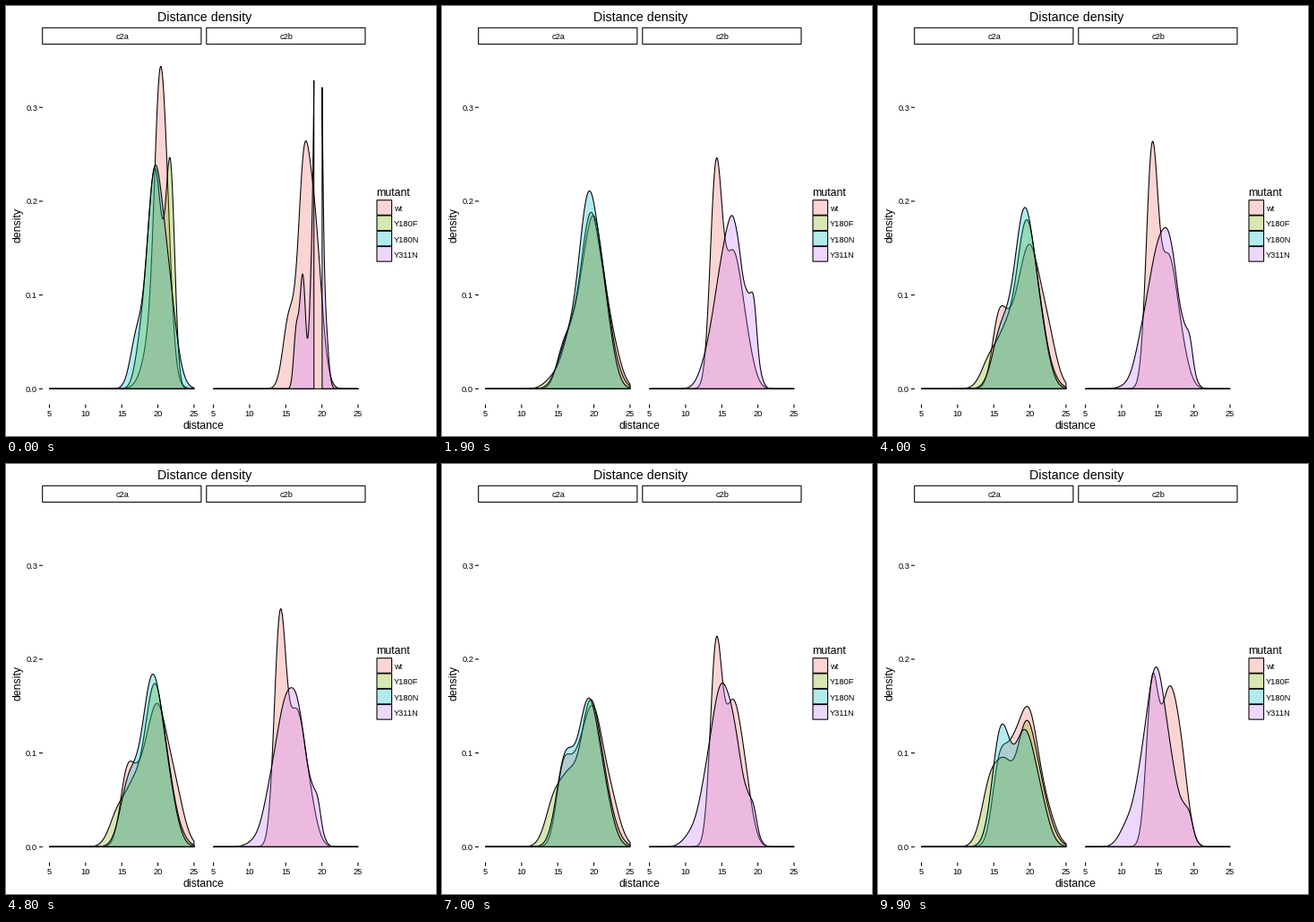
A matplotlib script for the animation above (10 s loop, 480 px wide and 480 px high).

```python
import numpy as np
import matplotlib.pyplot as plt
from matplotlib.animation import FuncAnimation
from matplotlib.colors import to_rgba
from matplotlib.patches import Rectangle

FRAMES, STEP_MS = 100, 100
PHASES = 12, 30, 99
COLORS = {"wt": "#F8766D", "Y180F": "#7CAE00", "Y180N": "#00BFC4", "Y311N": "#C77CFF"}
LEFT = {"c2a": 48.5, "c2b": 231.6}
X_UNIT, Y_UNIT, Y_ZERO, Y_MAX = 8.07, 1047, 427.3, 0.35
X = np.linspace(5, 25, 512)

# Per curve: bells of the first sample (mean, spread, height), then bells of
# all later samples (mean, spread, height at each phase).
CURVES = {
    ("c2a", "wt"): (
        [(20.2, .7, .21), (21.2, .7, .12), (19.9, 1.4, .085)],
        [(19.7, 1.35, .185, .135, .135), (22.2, 1.3, .045, .07, .035),
         (17.4, 1.1, .05, .04, .07), (15.7, .95, .015, .07, .075)]),
    ("c2a", "Y180F"): (
        [(21.75, .6, .215), (19.6, 1.05, .233), (17.6, .8, .035)],
        [(19.5, 1.45, .175, .182, .128), (22, 1.3, .055, .025, .03),
         (16.6, 1, .045, .035, .055), (14.7, 1.25, .005, .03, .074)]),
    ("c2a", "Y180N"): (
        [(19.3, .95, .16), (20.9, 1.3, .14), (17.1, .9, .055)],
        [(19.2, 1.4, .2, .195, .115), (21.5, 1.2, .07, .045, .035),
         (16, 1.2, .035, .048, .122)]),
    ("c2b", "wt"): (
        [(17.4, .75, .167), (18.8, 1.05, .185), (15.5, .85, .077)],
        [(14.2, .8, .22, .265, .163), (16.4, 1.1, .14, .13, .15),
         (18.2, 1, .05, .025, .08)]),
    ("c2b", "Y311N"): (
        [(19.46, .42, .73), (17.35, .4, .12), (16.45, .35, .06),
         (18.5, .3, .08), (20.5, .4, .06)],
        [(16.7, 1.2, .175, .15, .075), (14.7, 1.15, .085, .1, .163),
         (12.8, 1.05, .01, .04, .06), (19, .8, .075, .035, .027),
         (10.8, 1.1, 0, 0, .022)]),
}


def bell(mean, spread, height):
    return height * np.exp(-((X - mean) / spread) ** 2 / 2)


def density(first, later, k):
    """Running average: the first sample fades as 1 / (k + 1)."""
    start = sum(bell(*b) for b in first)
    drift = sum(bell(m, s, np.interp(k, PHASES, h)) for m, s, *h in later)
    return (start + k * drift) / (k + 1)


plt.rcParams["font.family"] = "Liberation Sans"
fig = plt.figure(figsize=(480 / 72, 480 / 72), dpi=72, facecolor="white")
ax = fig.add_axes([0, 0, 1, 1])
ax.set(xlim=(0, 480), ylim=(480, 0))
ax.axis("off")


def label(x, y, s, size=9.3, ha="center", **kw):
    ax.text(x, y, s, fontsize=size, ha=ha, va="baseline", color="black", **kw)


def line(xs, ys):
    ax.plot(xs, ys, color="black", lw=1.07, snap=False)


def box(x, y, w, h, fill="none"):
    ax.add_patch(Rectangle((x, y), w, h, fc=fill, ec="black", lw=1.07, snap=False))


label(221.8, 17, "Distance density", 14.3)
label(220.7, 472, "distance", 12.2)
label(16.6, 244.5, "density", 12.2, rotation=90, rotation_mode="anchor")

for panel, left in LEFT.items():
    box(left - 7.8, 24.3, 177.2, 18.3)
    label(left + 81.3, 37.3, panel)
    for v in range(5, 26, 5):
        px = left + (v - 5) * X_UNIT
        line([px, px], [445.3, 448.2])
        label(px, 458, str(v))
for v in (0, .1, .2, .3):
    py = Y_ZERO - v * Y_UNIT
    line([37.5, 40.4], [py, py])
    label(35.2, py + 3.4, f"{v:.1f}", ha="right")

label(413.5, 212, "mutant", 12.2, "left")
for i, (name, color) in enumerate(COLORS.items()):
    top = 216.7 + 17.28 * i
    box(414, top, 16.6, 16.6, to_rgba(color, .3))
    label(433.3, top + 12.3, name, 9.2, "left")

shapes = []


def draw(k):
    while shapes:
        shapes.pop().remove()
    for (panel, name), (first, later) in CURVES.items():
        y = density(first, later, k)
        inside = np.flatnonzero(y <= Y_MAX)
        # Values over the limit are cut out, leaving separate areas.
        for run in np.split(inside, np.flatnonzero(np.diff(inside) > 1) + 1):
            px = LEFT[panel] + (X[run] - 5) * X_UNIT
            py = Y_ZERO - y[run] * Y_UNIT
            shapes.extend(ax.fill(np.r_[px, px[-1], px[0]], np.r_[py, Y_ZERO, Y_ZERO],
                                  fc=to_rgba(COLORS[name], .3), ec="black",
                                  lw=1.07, joinstyle="round"))
    return shapes


anim = FuncAnimation(fig, draw, frames=FRAMES, interval=STEP_MS,
                     init_func=lambda: draw(0), repeat=True, repeat_delay=0)
plt.show()
```
